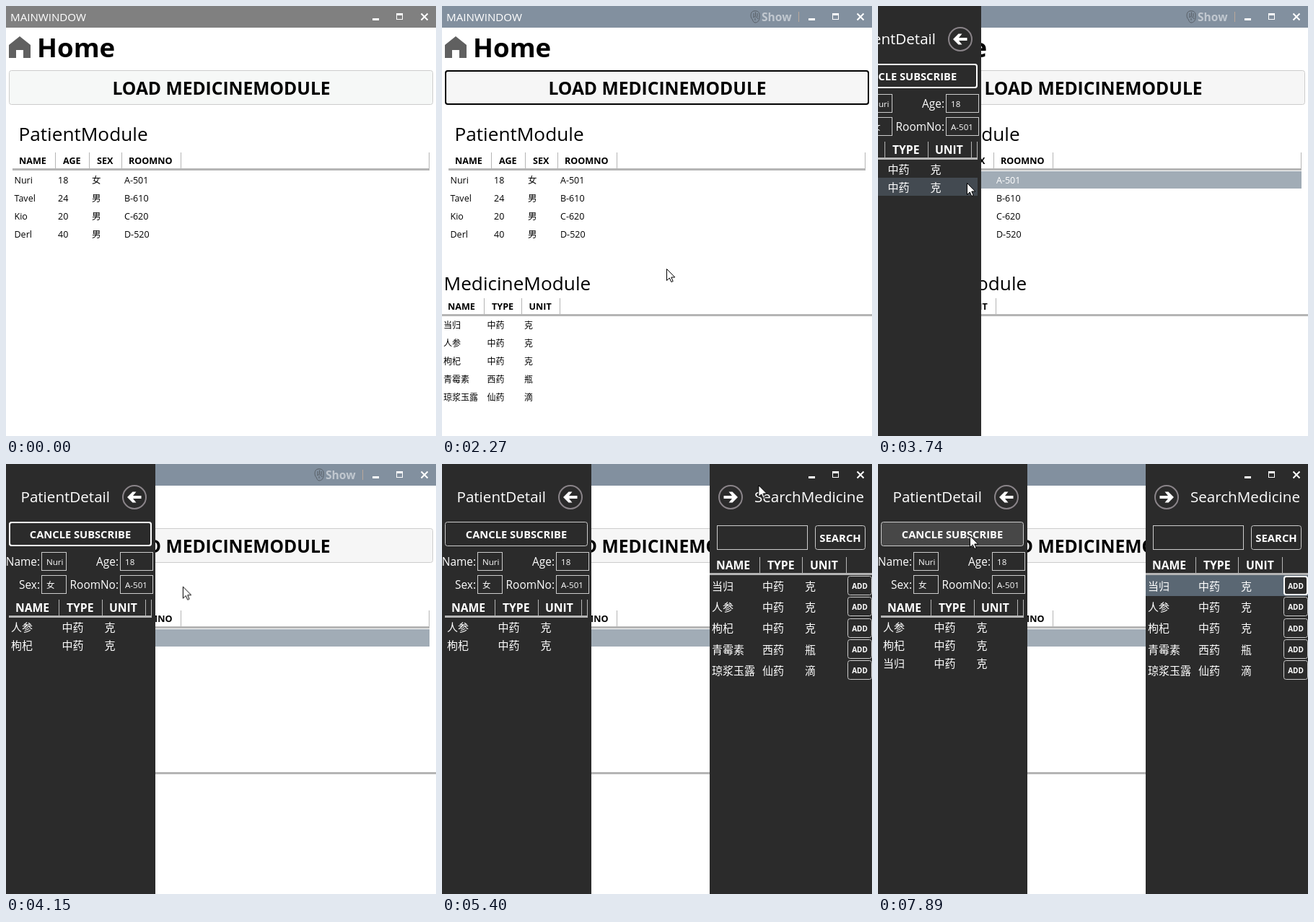
An HTML page that plays this animation: 596 by 596 pixels, repeating every 8000 ms.

```html
<!DOCTYPE html>
<html lang="zh-CN">
<head>
<meta charset="utf-8">
<title>Module window</title>
<style>
html, body { margin: 0; width: 100%; height: 100%; overflow: hidden; background: #fff; }
svg { display: block; width: 596px; height: 596px; }
text { font-family: "Open Sans", "Noto Sans CJK SC", "Noto Sans CJK", sans-serif; white-space: pre; }
</style>
</head>
<body>
<svg id="stage" viewBox="0 0 596 596"></svg>
<script>
const LOOP = 8000;
const stage = document.getElementById('stage');
const GREY = '#808080', BLUE = '#82909f', DARK = '#2b2b2b', LINE = '#b5b5b5', EDGE = '#cccccc';

function add(parent, tag, attrs = {}) {
  const el = document.createElementNS('http://www.w3.org/2000/svg', tag);
  for (const key in attrs) el.setAttribute(key, attrs[key]);
  return parent.appendChild(el);
}
const group = (parent, attrs) => add(parent, 'g', attrs);
const rect = (parent, x, y, width, height, fill, more) =>
  add(parent, 'rect', { x, y, width, height, fill, ...more });
const path = (parent, d, more) => add(parent, 'path', { d, ...more });
const box = (parent, x, y, w, h, rx, fill = 'none', stroke = EDGE) =>
  rect(parent, x + .5, y + .5, w - 1, h - 1, fill, { rx, stroke, 'stroke-width': 1 });

function label(parent, x, y, size, str, fill = '#000', more) {
  const el = add(parent, 'text', { x, y, 'font-size': size, fill, ...more });
  el.textContent = str;
  return el;
}
const bold = (parent, x, y, size, str, fill, more) =>
  label(parent, x, y, size, str, fill, { 'font-weight': 700, ...more });

// Holds each [time, value] until the next one.
function play(el, prop, steps, easing = () => 'step-end') {
  const frames = steps.map(([t, v], i) => ({ offset: t / LOOP, [prop]: v, easing: easing(i) }));
  frames.push({ offset: 1, [prop]: steps[steps.length - 1][1] });
  el.animate(frames, { duration: LOOP, iterations: Infinity });
}

// Header captions, column rules and the thick rule under them.
function header(parent, size, base, names, xs, rules, top, lineY, x0, x1, ink) {
  names.forEach((n, i) => bold(parent, xs[i], base, size, n, ink));
  rules.forEach(x => rect(parent, x, top, 1, lineY - top, LINE));
  rect(parent, x0, lineY, x1 - x0, 3, LINE);
}
function rows(parent, data, xs, base, step, size, ink) {
  return data.map((r, i) => {
    const g = group(parent, { fill: ink });
    r.forEach((s, c) => label(g, xs[c], base + i * step, size(c, s), s, 'inherit'));
    return g;
  });
}
const cjk = s => /[^\x00-\x7f]/.test(s);

const patients = [
  ['Nuri', '18', '女', 'A-501'],
  ['Tavel', '24', '男', 'B-610'],
  ['Kio', '20', '男', 'C-620'],
  ['Derl', '40', '男', 'D-520']
];
const drugs = [
  ['当归', '中药', '克'],
  ['人参', '中药', '克'],
  ['枸杞', '中药', '克'],
  ['青霉素', '西药', '瓶'],
  ['琼浆玉露', '仙药', '滴']
];
const drugHead = ['NAME', 'TYPE', 'UNIT'];

// Main window
rect(stage, 0, 0, 596, 596, '#fff');
const bar = rect(stage, 0, 0, 596, 30, GREY);
play(bar, 'fill', [[0, GREY], [720, BLUE], [1030, GREY], [2100, BLUE]]);
label(stage, 6, 21, 15.1, 'MAINWINDOW', '#fff');

const show = group(stage);
path(show, 'M430.5 19 C427 16 427 8 432 7 C438 6 441 9 440 15 C440 20 438 23 434 23 C432 23 431 21 430.5 19 M432 15 V10 M434.5 14 V8.5 M437 15 V10 M431 16 C434 14 437 15 438 18 M434 17 V20',
  { fill: 'none', stroke: '#2d2d2d', 'stroke-width': 1 });
bold(show, 443, 21, 15.6, 'Show', '#fff');
play(show, 'opacity', [[0, 0], [720, .5], [4550, 1]]);
play(rect(stage, 494, 8, 1, 14, '#b9a79b'), 'opacity', [[0, 0], [720, 1]]);

path(stage, 'M19 42 L34 54 V72 H24 V61 H14 V72 H4 V54 Z', { fill: '#606060' });
bold(stage, 43, 71, 36.6, 'Home');

const load = box(stage, 4, 89, 588, 48, 3, '#f6f7f7');
play(load, 'fill', [[0, '#f6f8f7'], [510, '#e2e4e3'], [1100, '#f6f6f6'], [4310, '#e2e4e3'], [4460, '#f6f8f7'], [4990, '#f6f6f6']]);
const focusSteps = [[0, 0], [720, 1], [1030, 0], [2100, 1], [3280, 0]];
play(rect(stage, 5, 90, 586, 46, 'none', { rx: 3, stroke: '#000', 'stroke-width': 2 }), 'opacity', focusSteps);
bold(stage, 298.5, 123, 24.6, 'LOAD MEDICINEMODULE', '#000', { 'text-anchor': 'middle' });

label(stage, 17.5, 187, 26.2, 'PatientModule');
header(stage, 12.6, 219, ['NAME', 'AGE', 'SEX', 'ROOMNO'], [18, 79, 126, 170],
  [68, 115, 160, 242, 586], 203, 225, 9, 587);
play(rect(stage, 9, 229, 578, 24, '#a1acb6'), 'opacity', [[0, 0], [2600, 1]]);
const people = rows(stage, patients, [11.5, 72, 119, 164], 246, 25, (c, s) => cjk(s) ? 12.5 : 12.5, '#000');
play(people[0], 'fill', [[0, '#000'], [3280, '#fff']]);

const medicine = group(stage);
label(medicine, 2.5, 393.5, 26.2, 'MedicineModule');
header(medicine, 12.6, 421, drugHead, [8, 69, 120.5], [58, 110, 163], 405, 427, 0, 596);
rows(medicine, drugs, [2, 62.5, 114], 447.3, 25, () => 12, '#000');
play(medicine, 'opacity', [[0, 0], [1030, 1]]);

// Round button with an arrow; dir is -1 for left, 1 for right
function arrow(parent, cx, dir) {
  const g = group(parent, { transform: `translate(${cx} 46) scale(${dir} 1)` });
  add(g, 'circle', { r: 16, fill: 'none', stroke: '#8a8489', 'stroke-width': 2 });
  path(g, 'M-9.5 -2 H2 L-2.5 -7.5 H2.5 L10 0 L2.5 7.5 H-2.5 L2 2 H-9.5 Z', { fill: '#fff' });
}

// Left flyout
const detail = group(stage);
rect(detail, 0, 0, 207, 596, DARK);
label(detail, 20.5, 53, 20.6, 'PatientDetail', '#fff');
arrow(detail, 178, -1);
const cancel = box(detail, 4, 80, 198, 34, 3, DARK);
play(cancel, 'fill', [[0, DARK], [7820, '#474747']]);
play(rect(detail, 5, 81, 196, 32, 'none', { rx: 3, stroke: '#fff', 'stroke-width': 2 }),
  'opacity', [[0, 1], [4990, 0]]);
bold(detail, 103, 102.5, 14.7, 'CANCLE SUBSCRIBE', '#fff', { 'text-anchor': 'middle' });
const [who, age, sex, room] = patients[0];
for (const [name, value, x, y, w] of [
  ['Name:', who, 49, 122, 35], ['Age:', age, 158, 122, 46],
  ['Sex:', sex, 49, 154, 35], ['RoomNo:', room, 158, 154, 46]]) {
  label(detail, x - 2, y + 18.5, 15.4, name, '#fff', { 'text-anchor': 'end' });
  box(detail, x, y, w, 26, 0);
  label(detail, x + 7, y + 17.5, 11.6, value, '#fff');
}
header(detail, 15.7, 205, drugHead, [13, 84, 143], [73, 133, 193, 201], 188, 210, 4, 202, '#fff');
play(rect(detail, 4, 238, 198, 25, '#434a51'), 'opacity', [[0, 1], [3950, 0]]);
const taken = rows(detail, [drugs[1], drugs[2], drugs[0]], [7, 77.5, 136.5], 231.6, 25, () => 15, '#fff');
play(taken[2], 'opacity', [[0, 0], [6940, 1]]);

// Right flyout
const search = group(stage);
rect(search, 371, 0, 225, 596, DARK);
arrow(search, 400, 1);
label(search, 433, 53, 20.6, 'SearchMedicine', '#fff');
const field = box(search, 381, 85, 126, 34, 0);
play(field, 'stroke', [[0, EDGE], [5570, '#fff'], [6710, EDGE]]);
play(rect(search, 387, 90, 1, 16, '#fff'), 'opacity', [[0, 0], [5570, 1], [6100, 0], [6570, 1], [6710, 0]]);
box(search, 517, 85, 70, 34, 3);
bold(search, 552, 107.5, 14.9, 'SEARCH', '#fff', { 'text-anchor': 'middle' });
header(search, 15.7, 146, drugHead, [380, 451, 510], [440, 499, 560], 129, 151, 371, 596, '#fff');
play(rect(search, 371, 154, 225, 29, DARK), 'fill', [[0, DARK], [5870, '#434a51'], [6940, '#5a6773']]);
rows(search, drugs, [374, 444, 503], 174.8, 29.3, () => 15, '#fff');
drugs.forEach((d, i) => {
  const y = Math.round(155 + i * 29.3);
  const b = box(search, 562, y, 34, 27, 3, DARK);
  if (!i) {
    play(b, 'fill', [[0, DARK], [5930, '#474747'], [6710, '#858585'], [6940, '#474747'], [7250, DARK]]);
    play(rect(search, 563, y + 1, 32, 25, 'none', { rx: 3, stroke: '#fff', 'stroke-width': 2 }),
      'opacity', [[0, 0], [6710, 1]]);
  }
  bold(search, 579, y + 17.5, 10, 'ADD', '#fff', { 'text-anchor': 'middle' });
});

// Both flyouts ease out over half a second, drawn about every 70 ms.
function slide(el, start, width) {
  const steps = [[0, `translate(${width}px, 0px)`]];
  for (let i = 0; i < 8; i++) {
    const t = i ? start - 10 + i * 70 : start;
    const left = Math.max(0, 1 - (t - start + 102) / 500);
    steps.push([t, `translate(${Math.round(width * left ** 3)}px, 0px)`]);
  }
  play(el, 'transform', steps);
}
slide(detail, 3680, -207);
slide(search, 4990, 225);

// Window buttons stay above the flyouts
path(stage, 'M508 17 H517 V20 H508 Z M541 10 H550 V19 H541 Z M542 13 V18 H549 V13 Z',
  { fill: '#fff', 'fill-rule': 'evenodd' });
path(stage, 'M575.5 10.5 L584.5 19.5 M584.5 10.5 L575.5 19.5', { stroke: '#fff', 'stroke-width': 2 });

// Message box
const dialog = group(stage);
rect(dialog, 207, 252, 201, 150, '#fff');
rect(dialog, 207, 252, 201, 29, '#8c96ac');
rect(dialog, 377, 253, 30, 27, '#b57f88');
path(dialog, 'M388.5 262 L397.5 271 M397.5 262 L388.5 271', { stroke: '#fff', 'stroke-width': 1.6 });
label(dialog, 218.5, 320.5, 11.3, 'MedicineModule模块被加载了');
rect(dialog, 207, 350, 201, 52, '#f0f0f0');
box(dialog, 207, 252, 201, 150, 0, 'none', '#8a8f99');
rect(dialog, 305, 363, 83, 26, '#f0f0f0', { stroke: '#666', 'stroke-width': 2 });
label(dialog, 346.5, 380, 11, '确定', '#000', { 'text-anchor': 'middle' });
play(dialog, 'opacity', [[0, 0], [1100, .15], [1180, .4], [1250, .8], [1320, 1], [2030, .6], [2100, .25], [2180, 0]]);

// Pointer
const pointer = group(stage);
path(pointer, 'M.5 .5 V16.5 L4.3 13 L6.8 18.5 L9.2 17.5 L6.8 12 H11.8 Z',
  { fill: '#fff', stroke: '#000', 'stroke-width': 1 });
play(pointer, 'opacity', [[0, 0], [70, 1]]);
const track = [
  [0, 372, 556], [70, 372, 556], [580, 430, 118], [1030, 430, 118], [1180, 390, 285],
  [1600, 325, 374], [1810, 313, 368], [2180, 313, 368], [2270, 311, 364], [2670, 112, 249],
  [2730, 119, 245], [3680, 123, 245], [3880, 123, 245], [4460, 448, 44], [4550, 452, 36],
  [4690, 459, 24], [5220, 459, 24], [5630, 397, 39], [5700, 572, 149], [5870, 578, 160],
  [5930, 580, 166], [6100, 581, 167], [6330, 584, 170], [7180, 584, 172], [7820, 140, 101], [7890, 127, 99]
];
play(pointer, 'transform', track.map(([t, x, y]) => [t, `translate(${x}px, ${y}px)`]), i => {
  const next = track[i + 1];
  return next ? `steps(${Math.max(1, Math.round((next[0] - track[i][0]) / 72))}, end)` : 'step-end';
});
</script>
</body>
</html>
```
